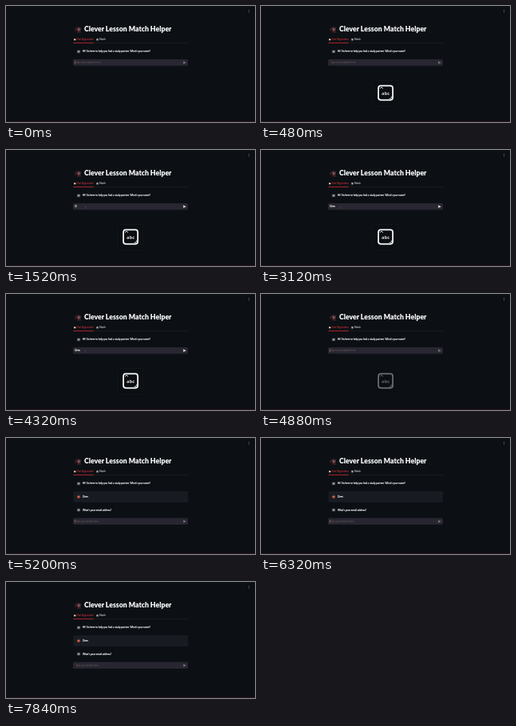
These frames come from a looping animation (312x146 px, 8 s). An HTML page:

```html
<!DOCTYPE html>
<html lang="en">
<head>
<meta charset="utf-8">
<title>Chat registration</title>
<style>
html, body { margin: 0; width: 100%; height: 100%; overflow: hidden; background: #0c1015; }
svg { display: block; width: 312px; height: 146px; font-family: Lato, "Open Sans", sans-serif; }
text { font-size: 3.05px; fill: #fff; white-space: pre; }
.said { stroke: #fff; stroke-width: .12px; }
.title { font-size: 8.7px; font-weight: 900; }
.tab { font-size: 2.8px; }
.on { fill: #e0353b; }
.hint { font-size: 2.9px; fill: #695e67; }
.abc { font: 600 6px "Open Sans", sans-serif; text-anchor: middle; }
</style>
</head>
<body>
<svg viewBox="0 0 312 146">
  <defs>
    <g id="bot">
      <rect x="-2.4" y="-2.4" width="4.8" height="4.8" rx="1.3" fill="#1f2229"/>
      <rect x="-1.5" y="-1.3" width="3" height="2.7" rx=".7" fill="#a9aaae"/>
      <path d="M-.8-.4h.5M.3-.4h.5M-.7.6h1.4" stroke="#5c3436" stroke-width=".5"/>
    </g>
    <g id="human">
      <rect x="-2.4" y="-2.4" width="4.8" height="4.8" rx="1.3" fill="#30242a"/>
      <circle r="1.6" fill="#e8734a"/>
      <path d="M-.8-.3h.5M.3-.3h.5M-.6.7h1.2" stroke="#6a2a20" stroke-width=".4"/>
    </g>
  </defs>
  <rect width="312" height="146" fill="#0c1015"/>
  <rect y="145" width="312" height="1" fill="#2a1318"/>
  <g fill="#b8babf">
    <circle cx="304.5" cy="5" r=".4"/><circle cx="304.5" cy="6.5" r=".4"/><circle cx="304.5" cy="8" r=".4"/>
  </g>

  <g>
    <path d="M86.2 28.2l4.6-2.2 4 2-3.8 2z" fill="#2f2830"/>
    <circle cx="91.4" cy="29.4" r="2.2" fill="#6b3640"/>
    <path d="M88.9 33.6q.2-3 2.6-3t2.7 3z" fill="#43202b"/>
    <path d="M87.2 28.4v3.2" stroke="#8c2f3d" stroke-width=".7"/>
    <circle cx="91" cy="30" r=".7" fill="#d7a3a0"/>
  </g>
  <text class="title" x="98" y="32.4">Clever Lesson Match Helper</text>

  <rect x="85" y="41.2" width="2.4" height="2" rx=".4" fill="#e6c4c4"/>
  <text class="tab on" x="88.4" y="43.2">Chat Registration</text>
  <rect x="113.3" y="41" width="2.4" height="2.4" rx=".4" fill="#aeb2b8"/>
  <path d="M114 42.2l.5.5.8-1" fill="none" stroke="#3d444c" stroke-width=".35"/>
  <text class="tab" x="117" y="43.2">Match</text>
  <rect x="84.5" y="46.2" width="144" height=".4" fill="#2b2d36"/>
  <rect x="84.5" y="46" width="25" height=".8" fill="#c4282e"/>

  <use href="#bot" x="91" y="57.3"/>
  <text class="said" x="96" y="58.4">Hi! I'm here to help you find a study partner. What's your name?</text>

  <g id="reply">
    <rect x="84.5" y="67" width="143.5" height="14" rx="1.6" fill="#181b22"/>
    <use href="#human" x="91" y="74"/>
    <text class="said" x="96" y="75.1">Oren</text>
    <use href="#bot" x="91" y="90.6"/>
    <text class="said" x="96" y="91.7">What's your email address?</text>
  </g>

  <g id="bar">
    <rect x="84" y="67" width="144" height="8.3" rx="1.6" fill="#282630"/>
    <text id="hint" class="hint" x="87.2" y="72.3">Type your response here...</text>
    <text id="typed" class="said" x="86.2" y="72.3"></text>
    <rect id="caret" y="69.3" width=".5" height="3.7" fill="#e58a8e"/>
    <path id="send" d="M221.8 69.5l3.9 1.8-3.9 1.8.5-1.5 1.6-.3-1.6-.3z"/>
    <path id="pointer" d="M99.2 71h1M99.7 71v2.4M99.2 73.4h1" stroke="#6d6c74" stroke-width=".35"/>
  </g>

  <g id="badge">
    <rect x="140.3" y="93.5" width="31.6" height="32.4" rx="2.2" fill="#0b0e12" stroke="#191d23" stroke-width=".6"/>
    <rect x="147.1" y="100.3" width="18" height="18" rx="3" fill="#0b0e12" stroke="#fff" stroke-width="1.7"/>
    <path d="M149 104l2-2 2 2M164 113.6q-.4 3-3.4 3.4" fill="none" stroke="#fff" stroke-width=".8"/>
    <text class="abc" x="156.2" y="111.7">abc</text>
  </g>
</svg>
<script>
const LOOP = 8000, TICK = 80, SENT = 4480, ANSWER = 5040;
const NAME = "Oren";
const keyTimes = [1040, 1920, 2400, 2560];
const caretOn = [[0, 320], [880, 1520], [1760, 3120], [3600, 4080], [4480, 4960], [5200, 5760], [6240, 6800], [7360, 7840]];
const el = id => document.getElementById(id);
const [reply, bar, hint, typed, caret, send, pointer, badge] =
  ["reply", "bar", "hint", "typed", "caret", "send", "pointer", "badge"].map(el);
const ramp = (t, a, b) => Math.min(1, Math.max(0, (t - a) / (b - a)));
const show = (node, on) => node.setAttribute("opacity", +on);

function draw(time) {
  const t = Math.floor(time % LOOP / TICK) * TICK;
  const count = t < SENT ? keyTimes.filter(k => k <= t).length : 0;
  const answered = t >= ANSWER;

  typed.textContent = NAME.slice(0, count);
  show(hint, !count);
  hint.textContent = answered ? "Type your answer here..." : "Type your response here...";
  send.setAttribute("fill", count ? "#fff" : "#85868d");

  const end = count ? typed.getComputedTextLength() : 0;
  caret.setAttribute("x", 86.2 + end);
  show(caret, caretOn.some(([a, b]) => t >= a && t < b));
  show(pointer, count > 0);

  show(reply, answered);
  bar.setAttribute("transform", `translate(0 ${answered ? 33.7 : 0})`);
  show(badge, ramp(t, 240, 480) * (1 - ramp(t, 4640, 5040)));
}

function frame() {
  draw(performance.now());
  requestAnimationFrame(frame);
}
frame();
</script>
</body>
</html>
```
